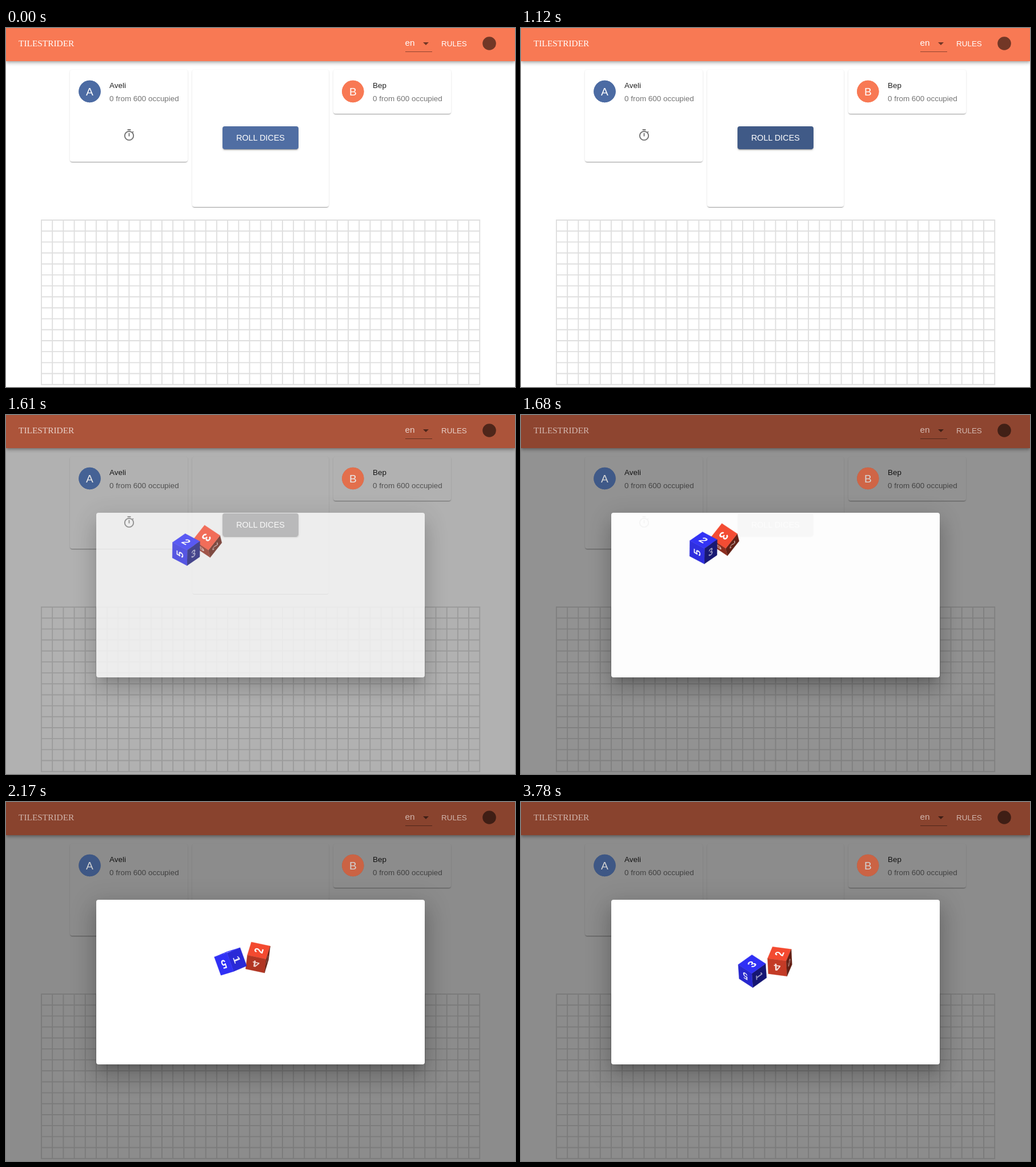
Animation of 891x628 px, one loop 3.85 s. Source, as an HTML page:

```html
<!DOCTYPE html>
<html lang="en">
<head>
<meta charset="utf-8">
<title>Dice board</title>
<style>
  html, body { margin: 0; width: 891px; height: 628px; overflow: hidden; background: #fff; }
  body { position: relative; }
  svg, div { position: absolute; }
  svg { left: 0; top: 0; }
  text { font-family: "Liberation Sans", Arial, sans-serif; }
  .card {
    top: 73px; background: #fff; border-radius: 4px;
    box-shadow: 0 2px 1px -1px rgba(0,0,0,.2), 0 1px 1px rgba(0,0,0,.14), 0 1px 3px rgba(0,0,0,.12);
  }
  #bar {
    left: 0; top: 0; width: 891px; height: 57.5px; background: #f87954;
    box-shadow: 0 2px 4px -1px rgba(0,0,0,.2), 0 4px 5px rgba(0,0,0,.14), 0 1px 10px rgba(0,0,0,.12);
  }
  #backdrop { left: 0; top: 0; width: 891px; height: 628px; background: #000; }
  #dialog {
    left: 158px; top: 171px; width: 575px; height: 288px; background: #fff; border-radius: 4px;
    box-shadow: 0 11px 14px -7px rgba(0,0,0,.2), 0 23px 36px 3px rgba(0,0,0,.14), 0 9px 44px 8px rgba(0,0,0,.12);
  }
  #leaving { left: 0; top: 0; width: 891px; height: 628px; }
  #button {
    left: 379.2px; top: 172.2px; width: 132.5px; height: 40.3px; border-radius: 4px; color: #fff;
    font: 14.4px/41px "Liberation Sans", Arial, sans-serif; text-align: center;
    box-shadow: 0 3px 1px -2px rgba(0,0,0,.2), 0 2px 2px rgba(0,0,0,.14), 0 1px 5px rgba(0,0,0,.12);
  }
</style>
</head>
<body>
<div id="bar"></div>
<div class="card" style="left:112px;width:206px;height:161px"></div>
<div class="card" style="left:325.7px;width:239.8px;height:239.5px"></div>
<div class="card" style="left:573px;width:206px;height:76.5px"></div>

<svg width="891" height="628">
  <path id="grid" fill="none" stroke="#dfdfdf" stroke-width="1.9"/>
  <g fill="#000">
    <path d="M730 25h10l-5 5z" fill-opacity=".54"/>
    <path d="M699 41h47v1h-47z" fill-opacity=".42"/>
    <circle cx="846" cy="27" r="11.8" fill-opacity=".54"/>
  </g>
  <g id="avatars" font-size="19.2" text-anchor="middle">
    <circle cx="146.5" cy="111" r="19.2" fill="#4c6ba3"/>
    <circle cx="607.3" cy="111" r="19.2" fill="#f87954"/>
    <text x="146.5" y="118" fill="#fff">A</text>
    <text x="607.3" y="118" fill="#fff">B</text>
  </g>
  <g font-size="13.44" fill="#212121">
    <text x="181" y="104.5">Aveli</text>
    <text x="642" y="104.5">Bep</text>
    <g fill="#757575">
      <text x="181" y="127.5">0 from 600 occupied</text>
      <text x="642" y="127.5">0 from 600 occupied</text>
    </g>
  </g>
</svg>

<div id="backdrop"></div>
<svg id="labels" width="891" height="628" fill="#fff">
  <text x="22" y="31.7" font-size="15.36" style="font-family:'Liberation Serif',Times,serif">TILESTRIDER</text>
  <text x="698.5" y="31" font-size="15.36">en</text>
  <text x="762" y="31.8" font-size="13.44">RULES</text>
  <use href="#avatars"/>
</svg>

<div id="dialog"></div>
<div id="leaving">
  <div id="button">ROLL DICES</div>
  <svg width="891" height="628">
    <g transform="translate(204 176) scale(.96)" fill="none" stroke="#757575" stroke-width="2">
      <path d="M9 2h6M12 8v6M18.3 6.7l1.4-1.4"/>
      <circle cx="12" cy="13" r="8"/>
    </g>
  </svg>
</div>
<svg id="dice" width="891" height="628" font-size="22" font-weight="bold" text-anchor="middle"></svg>

<script>
const LOOP = 3850, STEP = 70, TOSS = 1680, LAND = 2170, HALF = 17;
const $ = id => document.getElementById(id);
const clamp = (v, lo, hi) => Math.min(hi, Math.max(lo, v));
const mix = (a, b, u) => a.map((v, i) => v + (b[i] - v) * u);
const rgb = c => `rgb(${c.map(Math.round)})`;

// cubic-bezier(.4, 0, .2, 1) running from one time over a duration.
function ease(t, from, duration) {
  const x = clamp((t - from) / duration, 0, 1);
  let lo = 0, hi = 1;
  for (let i = 0; i < 20; i++) {
    const s = (lo + hi) / 2, r = 1 - s;
    if (1.2 * s * r * r + .6 * s * s * r + s ** 3 < x) lo = s; else hi = s;
  }
  return 3 * hi * hi * (1 - hi) + hi ** 3;
}

const dot = (a, b) => a[0] * b[0] + a[1] * b[1] + a[2] * b[2];
const cross = (a, b) => [a[1] * b[2] - a[2] * b[1], a[2] * b[0] - a[0] * b[2], a[0] * b[1] - a[1] * b[0]];
const scale = (a, k) => a.map(v => v * k);

// Each pose: centre x, y, then yaw, tilt and roll in degrees.
const DICE = [
  { color: [243, 74, 48],
    toss: [356.5, 218, 130, 67, -14], land: [441, 272, 83, -45, 17], rest: [453, 279, 70, -49, 23] },
  { color: [48, 48, 245],
    toss: [319.3, 232.5, 45, 31, 118], land: [393, 279, -47, 3, -20], rest: [405, 296, -48, 43, -4] }
];

// Axis along which each digit from 1 to 6 is read; the sign flips it.
const READING = [-2, 2, -3, -3, -1, 1];
const LIGHT = [-.4, -.6, .7];

function poseAt({ toss, land, rest }, t) {
  if (t < TOSS) {
    const back = (TOSS - t) / STEP;
    return [toss[0] - 4 * back, toss[1] + 3 * back * back, ...toss.slice(2)];
  }
  if (t < LAND) {
    const u = (t - TOSS) / (LAND - TOSS);
    return mix(toss, land, u * u * (3 - 2 * u));
  }
  return mix(land, rest, 1 - Math.exp((LAND - t) / 180));
}

function rotate([x, y, z], angles) {
  const [yaw, tilt, roll] = angles.map(a => a * Math.PI / 180);
  const turn = (a, b, w) => [a * Math.cos(w) + b * Math.sin(w), b * Math.cos(w) - a * Math.sin(w)];
  [x, z] = turn(x, z, yaw);
  [y, z] = turn(y, z, tilt);
  [x, y] = turn(x, y, -roll);
  return [x, y, z];
}

function drawDie(die, t) {
  const [cx, cy, ...angles] = poseAt(die, t);
  const frame = [[1, 0, 0], [0, -1, 0], [0, 0, 1]].map(v => rotate(v, angles));
  const axis = k => scale(frame[Math.abs(k) - 1], Math.sign(k));

  return READING.map((reading, i) => {
    const n = axis((i >> 1) + 1).map(v => i % 2 ? -v : v);
    if (n[2] < .02) return '';
    const r = axis(reading), d = cross(n, r);
    const glow = clamp(.6 + .75 * dot(n, LIGHT), .4, 1);
    const fill = rgb(scale(die.color, glow));
    const m = [r[0], r[1], d[0], d[1], cx + n[0] * HALF, cy + n[1] * HALF];
    return `<g transform="matrix(${m.map(v => v.toFixed(4))})">` +
      `<rect x="${-HALF}" y="${-HALF}" width="${2 * HALF}" height="${2 * HALF}" fill="${fill}" stroke="${fill}" stroke-width=".4"/>` +
      `<text y="7.7" fill="#fff" fill-opacity="${.2 + .8 * glow}">${i + 1}</text></g>`;
  }).join('');
}

const IDLE = [80, 110, 163], HOVER = [64, 90, 135], DISABLED = [170, 170, 170];

function render(t) {
  const dim = ease(t, 1508, 235), open = ease(t, 1507, 205);
  $('backdrop').style.opacity = .45 * dim;
  $('labels').style.opacity = 1 - .4 * dim;
  $('dialog').style.opacity = $('dice').style.opacity = open;

  const hovered = mix(IDLE, HOVER, ease(t, 210, 250));
  $('button').style.background = rgb(mix(hovered, DISABLED, ease(t, 1470, 170)));
  $('leaving').style.opacity = 1 - ease(t, 1570, 155);
  $('dice').innerHTML = DICE.map(die => drawDie(die, t)).join('');
}

function buildGrid() {
  const cell = 19.18, left = 62, top = 336, cols = 40, rows = 15;
  let path = '';
  for (let i = 0; i <= cols; i++) path += `M${left + i * cell} ${top - 1}v${rows * cell + 2}`;
  for (let j = 0; j <= rows; j++) path += `M${left - 1} ${top + j * cell}h${cols * cell + 2}`;
  $('grid').setAttribute('d', path);
}

buildGrid();
const start = performance.now();
function tick() {
  const t = (performance.now() - start) % LOOP;
  render(Math.floor(t / STEP) * STEP);
  requestAnimationFrame(tick);
}
tick();
</script>
</body>
</html>
```
